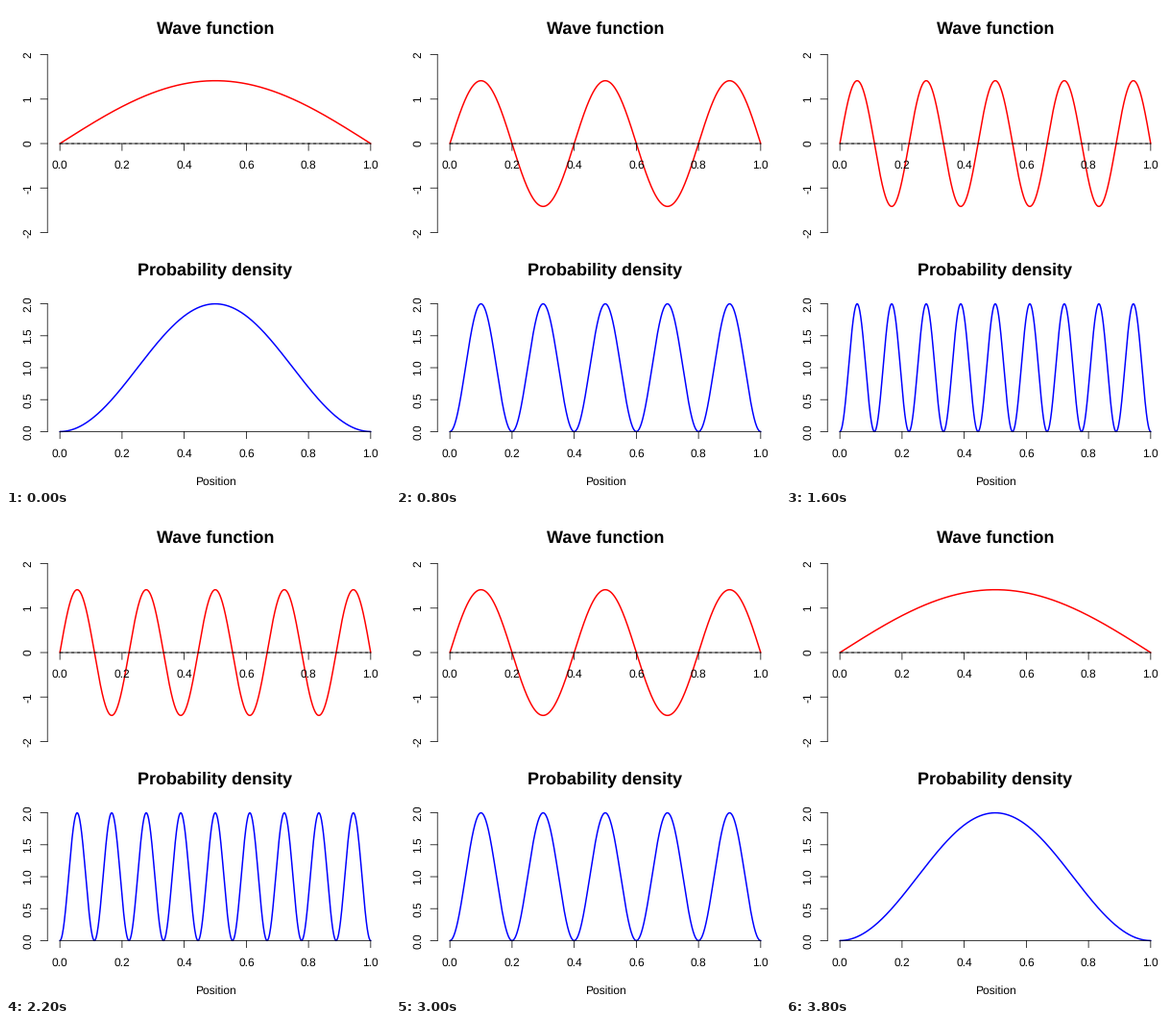
These frames come from a looping animation (400 px wide and 500 px high, 4000 ms). A matplotlib script:

```python
import numpy as np
import matplotlib.pyplot as plt
from matplotlib.animation import FuncAnimation

W, H, DPI = 400, 500, 100
PT = 72 / DPI                     # points per pixel
LEFT, RIGHT = 56.15, 379.85       # pixel x of position 0 and 1
AXIS_X = 43.2
TICK = 7.2
THIN, THICK = 0.75 * PT, 1.5 * PT

plt.rcParams["font.family"] = "Liberation Sans"
plt.rcParams["text.hinting"] = "none"
plt.rcParams["axes.unicode_minus"] = False

fig = plt.figure(figsize=(W / DPI, H / DPI), dpi=DPI, facecolor="white")
ax = fig.add_axes([0, 0, 1, 1])
ax.set_xlim(0, W)
ax.set_ylim(H, 0)
ax.axis("off")


def px(x):
    return LEFT + (RIGHT - LEFT) * x


def wave_y(v):
    return 143 - 46.2 * v


def density_y(v):
    return 442.4 - 66.4 * v


def rule(x0, y0, x1, y1, **style):
    ax.plot([x0, x1], [y0, y1], color="black", lw=THIN, snap=False,
            zorder=3, **style)


def label(x, y, text, size=12, **style):
    ax.text(x, y, text, fontsize=size * PT, ha="center", va="baseline",
            rotation_mode="anchor", color="black", zorder=4, **style)


def x_axis(y):
    rule(LEFT, y, RIGHT, y)
    for v in np.linspace(0, 1, 6):
        rule(px(v), y, px(v), y + TICK)
        label(px(v), y + 26, f"{v:.1f}")


def y_axis(scale, values, fmt):
    rule(AXIS_X, scale(values[0]), AXIS_X, scale(values[-1]))
    for v in values:
        rule(AXIS_X - TICK, scale(v), AXIS_X, scale(v))
        label(26, scale(v), format(v, fmt), rotation=90)


def curve(color):
    line, = ax.plot([], [], color=color, lw=THICK, snap=False, zorder=2,
                    solid_capstyle="round", solid_joinstyle="round")
    return line


label(218, 29, "Wave function", 18, weight="bold")
x_axis(wave_y(0))
y_axis(wave_y, range(-2, 3), "d")
rule(LEFT, wave_y(0), RIGHT, wave_y(0), dashes=(4, 4), dash_capstyle="butt")

label(218, 279, "Probability density", 18, weight="bold")
x_axis(density_y(0))
y_axis(density_y, np.linspace(0, 2, 5), ".1f")
label(218, 498, "Position")

wave = curve("red")
density = curve("blue")
pos = np.linspace(0, 1, 1001)


def update(i):
    level = min(i + 1, 20 - i)    # 1..10, then back from 10 to 1
    psi = np.sqrt(2) * np.sin(level * np.pi * pos)
    wave.set_data(px(pos), wave_y(psi))
    density.set_data(px(pos), density_y(psi ** 2))
    return wave, density


anim = FuncAnimation(fig, update, frames=20, interval=200, repeat=True,
                     repeat_delay=0, init_func=lambda: update(0))
plt.show()
```
